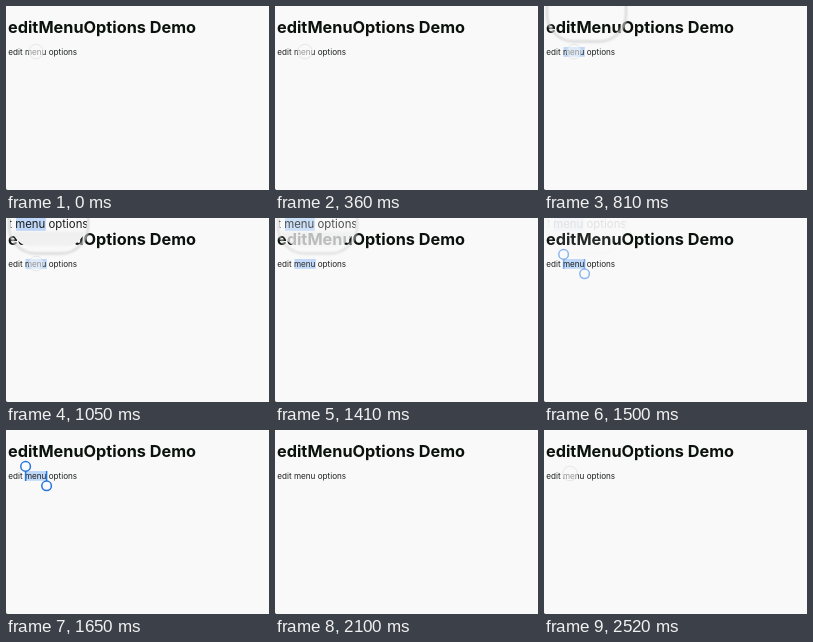
An HTML page for the animation above (2.55 s loop, 263 by 184 pixels).

```html
<!DOCTYPE html>
<html lang="en">
<head>
<meta charset="utf-8">
<title>Edit menu options</title>
<style>
  html, body { margin: 0; width: 100%; height: 100%; overflow: hidden; background: #f9f9f9; }
  svg { display: block; width: 263px; height: 184px; font-family: Inter, sans-serif; }
  .title { font-size: 16.3px; font-weight: 700; fill: #0b120e; }
  .body { font-size: 8.15px; fill: #1c1f1e; }
  .selection { fill: #bfd7f8; }
  .handle { fill: #fafcff; stroke: #2475de; stroke-width: 1.5; }
</style>
</head>
<body>
<svg viewBox="0 0 263 184">
  <defs>
    <clipPath id="lensClip"><rect x="4" y="-30" width="77" height="60" rx="26"/></clipPath>
    <filter id="soft" x="-20%" y="-20%" width="140%" height="140%"><feGaussianBlur stdDeviation="1"/></filter>
    <linearGradient id="tint" gradientUnits="userSpaceOnUse" x1="0" y1="11" x2="0" y2="30" gradientTransform="translate(0 0)">
      <stop offset="0" stop-color="#f9f9f9"/>
      <stop offset=".25" stop-color="#efefef"/>
      <stop offset=".8" stop-color="#f1f1f1"/>
      <stop offset="1" stop-color="#f9f9f9"/>
    </linearGradient>
    <text id="line" class="body" x="2.3" y="48.8">edit menu options</text>
  </defs>

  <path d="M0 182.5Q.2 183.8 1.5 184H0z" fill="#444"/>
  <text class="title" x="2" y="26.7">editMenuOptions Demo</text>
  <rect id="selection" class="selection" x="19.5" y="41" width="21.3" height="9.8"/>
  <use href="#line"/>

  <rect id="rim" x="3" y="-30" width="79" height="65.5" rx="27" fill="none" stroke="#d2d2d2" stroke-width="2" filter="url(#soft)"/>
  <g id="lens" clip-path="url(#lensClip)">
    <rect x="4" y="-30" width="77" height="60" fill="url(#tint)"/>
    <g transform="translate(-17.3 -58.3) scale(1.4)">
      <rect class="selection" x="19.5" y="41" width="21.3" height="9.8"/>
      <use href="#line"/>
    </g>
  </g>

  <g id="handles" class="handle">
    <path d="M19.6 41V51M40.6 41V51"/>
    <circle cx="19.6" cy="36.4" r="4.8"/>
    <circle cx="40.6" cy="55.8" r="4.8"/>
  </g>
  <circle id="touch" r="7.3" fill="#fafafa" fill-opacity=".55" stroke="#d6d8da" stroke-opacity=".7" stroke-width=".8"/>
</svg>
<script>
  const LOOP = 2550;
  const part = id => document.getElementById(id);
  const ramp = (t, from, to) => Math.min(1, Math.max(0, (t - from) / (to - from)));
  const fade = (id, opacity) => part(id).setAttribute('opacity', opacity);

  function draw(now) {
    const t = now % LOOP;
    const lensOut = 1 - ramp(t, 1380, 1515);
    const returning = t >= 2520;

    fade('selection', t < 2100 ? ramp(t, 570, 690) : 0);
    fade('rim', ramp(t, 600, 810) * lensOut);
    fade('lens', t >= 1050 ? lensOut : 0);
    fade('handles', t < 2100 ? ramp(t, 1440, 1560) : 0);
    fade('touch', returning ? 1 : 1 - ramp(t, 1350, 1420));
    part('touch').setAttribute('transform', returning ? 'translate(26 43.5)' : 'translate(30 45.6)');
    requestAnimationFrame(draw);
  }
  requestAnimationFrame(draw);
</script>
</body>
</html>
```
